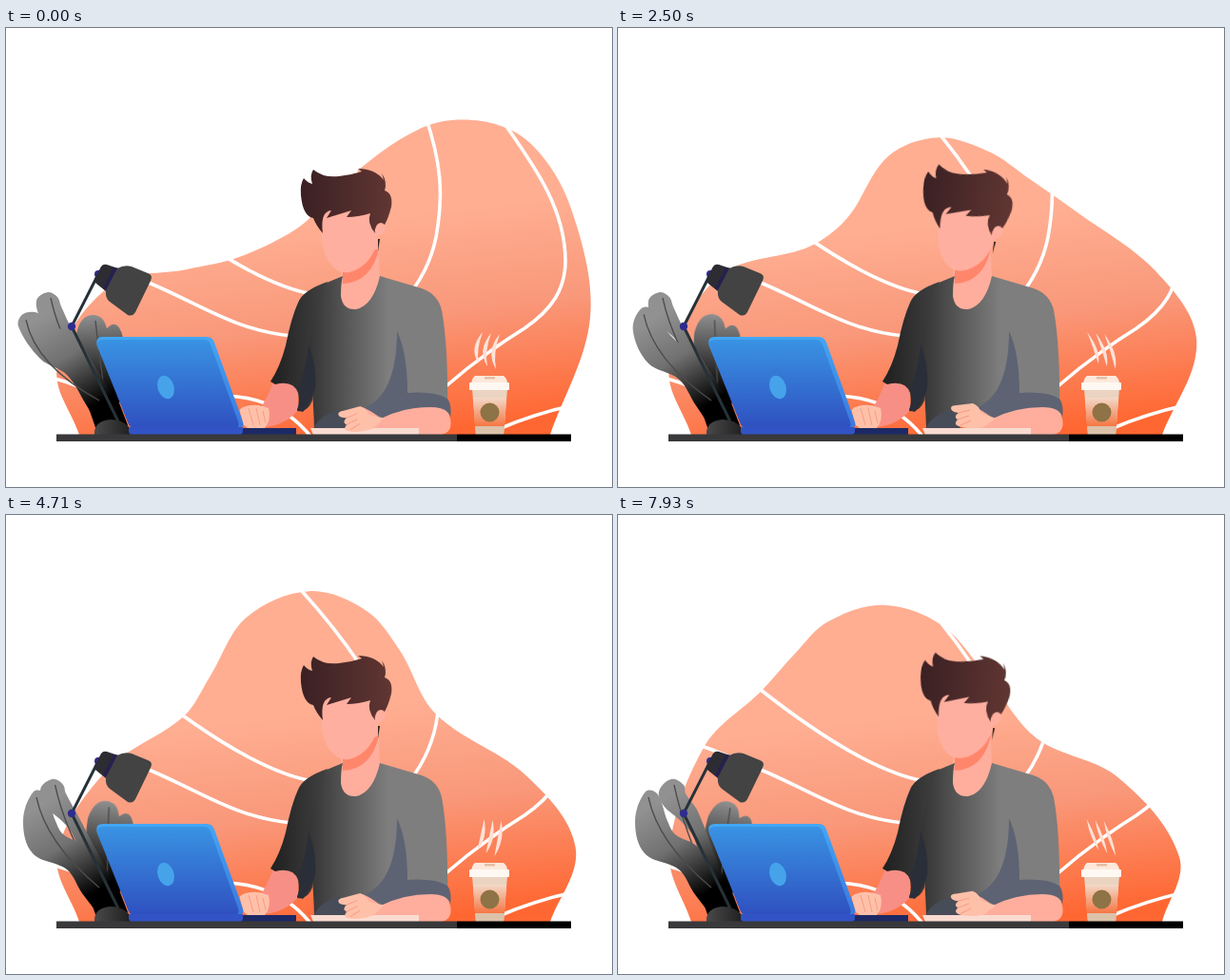
Animation of 637 by 483 pixels, one loop 8 s. Source, as an HTML page:

```html
<!DOCTYPE html>
<html lang="en">
<head>
<meta charset="utf-8">
<title>Working at a desk</title>
<style>
  html, body { margin: 0; width: 100%; height: 100%; overflow: hidden; background: #fff; }
  svg { display: block; width: 100%; height: 100%; }
  .lines { fill: none; stroke: #fff; stroke-width: 3.6; }
  .vein { fill: none; stroke: #4b4b4b; stroke-width: 1.3; }
  .arm { fill: none; stroke: #263238; stroke-width: 3; }
  .crease { fill: none; stroke: #f79c86; stroke-width: 1; }
  .skin { fill: #ffae9d; }
  .hand { fill: #ffc0a9; }
  .sway { transform-origin: 105px 400px; animation: sway 8s linear infinite; }
  @keyframes sway { to { transform: rotate(15deg); } }
</style>
</head>
<body>
<svg viewBox="0 0 637 483">
  <defs>
    <linearGradient id="coral" gradientUnits="userSpaceOnUse" x1="320" y1="208" x2="347" y2="436">
      <stop stop-color="#ffae92"/><stop offset=".46" stop-color="#f9987a"/><stop offset="1" stop-color="#ff6732"/>
    </linearGradient>
    <linearGradient id="leafFill" gradientUnits="userSpaceOnUse" x1="38" y1="305" x2="92" y2="398">
      <stop stop-color="#919191"/><stop offset=".45" stop-color="#717171"/><stop offset="1" stop-color="#000"/>
    </linearGradient>
    <linearGradient id="backFill" gradientUnits="userSpaceOnUse" x1="98" y1="300" x2="102" y2="385">
      <stop stop-color="#929292"/><stop offset="1" stop-color="#000"/>
    </linearGradient>
    <linearGradient id="potFill"><stop stop-color="#4a4a4a"/><stop offset="1" stop-color="#1c1c1c"/></linearGradient>
    <linearGradient id="lidFill" x2="0" y2="1"><stop stop-color="#3993e3"/><stop offset="1" stop-color="#2f50c0"/></linearGradient>
    <linearGradient id="edgeFill" x2="0" y2="1"><stop stop-color="#43a7f4"/><stop offset="1" stop-color="#3a78e0"/></linearGradient>
    <linearGradient id="shirt" gradientUnits="userSpaceOnUse" x1="310" y1="0" x2="402" y2="0">
      <stop stop-color="#2c2c2c"/><stop offset="1" stop-color="#7e7e7e"/>
    </linearGradient>
    <linearGradient id="sleeve" gradientUnits="userSpaceOnUse" x1="285" y1="0" x2="352" y2="0">
      <stop stop-color="#232323"/><stop offset="1" stop-color="#4a4a4a"/>
    </linearGradient>
    <linearGradient id="hairFill"><stop stop-color="#3a2023"/><stop offset="1" stop-color="#613632"/></linearGradient>
    <linearGradient id="cupSleeve" x2="0" y2="1"><stop stop-color="#f3d9c8"/><stop offset="1" stop-color="#f67643"/></linearGradient>
  </defs>

  <path id="blob" fill="url(#coral)"/>
  <g class="lines">
    <path d="M296 64Q340 110 371 156"/>
    <path d="M440 90C458 142 460 176 452 220Q446 250 428 275"/>
    <path d="M525 102C555 145 588 190 588 245C588 275 574 296 545 316Q500 344 460 379"/>
    <path d="M130 168C190 217 265 270 322 280"/>
    <path d="M70 237Q110 250 150 268C205 291 240 318 300 324"/>
    <path d="M48 368Q75 375 105 390M230 387C270 388 300 403 322 432"/>
    <path d="M518 422Q555 406 596 397"/>
  </g>

  <path d="M80 380L100 345L128 418L96 426Z"/>
  <g class="sway">
    <path fill="url(#backFill)" d="M94 402Q72 350 74 322Q78 301 93 302Q103 303 106 316Q118 304 123 326L124 392Z"/>
    <path class="vein" d="M94 308Q98 345 104 385"/>
  </g>
  <path id="middle" fill="url(#leafFill)"/><path id="middleVein" class="vein"/>
  <path id="left" fill="url(#leafFill)"/><path id="leftVein" class="vein"/>

  <path class="arm" d="M97 259L69 314L118 414"/>
  <g fill="#2f2c8f"><circle cx="97" cy="259" r="4"/><circle cx="69" cy="314" r="4.2"/></g>
  <path fill="#2c2c32" d="M100 251Q102 248 106 249L118 253L105 277L95 269Q92 266 94 262Z"/>
  <path fill="#25214f" d="M113 252L119 253L107 278L102 274Z"/>
  <path fill="#434343" d="M117 253Q124 249 132 251L149 258Q155 260 152 266L136 299Q133 304 128 302L109 288Q104 284 105 276Z"/>
  <path fill="url(#potFill)" d="M93 428Q92 414 109 412Q128 412 134 428Z"/>

  <path class="skin" d="M391 218L393 262L398 285L372 301L349 293L353 250Z"/>
  <path fill="#ff866b" d="M392 232Q384 268 354 269V248Z"/>

  <path fill="#f78f86" d="M281 373Q299 370 307 381V402Q296 416 274 420L266 403Q274 390 281 373Z"/>
  <path fill="url(#shirt)" d="M354 261Q352 268 352 282Q354 297 368 296Q386 292 393 261L437 274Q454 280 458 297Q465 335 464 402L395 411L350 421H324Q322 360 315 330Q306 288 330 271Z"/>
  <path fill="url(#sleeve)" d="M338 267Q312 276 307 289Q300 304 294 334Q288 357 278 372L283 375Q302 370 307 384Q309 394 306 403Q317 405 322 392Q328 365 318 333Q324 290 338 267Z"/>
  <path fill="#2a2e38" d="M318 333Q327 355 325 379Q319 397 312 404L306 402Q311 391 307 378Q315 362 318 333Z"/>
  <path fill="#5d6373" d="M411 319Q422 342 422 384Q450 382 464 390Q469 397 467 410L400 412L376 400Q411 386 411 319Z"/>
  <path fill="#474c59" d="M323 422Q330 406 352 402L360 421Z"/>
  <path class="skin" d="M372 398Q382 401 394 411Q418 399 446 399Q466 399 467 411Q470 425 458 428H434V421H370Z"/>
  <path fill="#f9dbd1" d="M320 421H434V428H323Z"/>
  <g id="hand">
    <path class="hand" d="M350 400Q350 397 356 397L373 395Q379 397 382 405L397 411L384 420Q370 423 358 419Q352 417 357 412Q352 409 358 405Q350 404 350 400Z"/>
    <path class="crease" d="M358 405L370 402M357 412L369 408M360 418L371 413"/>
  </g>

  <g id="head">
    <path fill="#ffaf9f" d="M332 190C330 212 330 233 341 248Q349 259 361 257C378 253 390 236 391 219Q400 216 399 207Q394 201 389 208L384 185L340 184Z"/>
    <path fill="#35201f" d="M391 222H393L391 235Z"/>
    <path fill="url(#hairFill)" d="M323 149Q334 158 350 156Q362 155 374 151L370 148Q388 148 397 160L395 153Q401 162 398 171Q407 174 405 188Q402 200 398 207Q394 203 390 207Q387 212 388 216Q379 205 383 195Q370 199 358 199L363 192Q350 196 337 200L342 192Q330 193 333 216Q326 208 323 200Q312 198 310 176Q309 164 313 158Q317 163 322 164Q319 155 323 149Z"/>
  </g>

  <rect x="240" y="421" width="65" height="7" fill="#1d2964"/>
  <path fill="url(#edgeFill)" d="M102 325H211Q217 325 219 331L249 414Q251 421 244 421H134L96 335Q93 325 102 325Z"/>
  <path fill="url(#lidFill)" d="M103 328H208Q213 328 215 333L244 414Q246 420 241 421H135Q130 421 128 415L96 335Q94 328 103 328Z"/>
  <path fill="#3153c6" d="M129 420H249V424Q249 428 245 428H133Q129 428 129 424Z"/>
  <ellipse cx="168" cy="378" rx="8.5" ry="12.5" fill="#46a3ea" transform="rotate(-18 168 378)"/>
  <path class="hand" d="M276 400Q266 396 257 397Q244 399 246 404L250 418L254 421H272Q279 413 276 400Z"/>
  <path class="crease" d="M255 400L260 418M263 400L267 418M270 403L273 416"/>

  <path fill="#fde9dc" d="M493 366H523Q527 369 527 374H489Q490 368 493 366Z"/>
  <rect x="503" y="367" width="11" height="2.5" fill="#e5bfa6"/>
  <path fill="#ead4c1" d="M490 380H527L523 428H494Z"/>
  <path fill="url(#cupSleeve)" d="M491 389H526L524 419H493Z"/>
  <path fill="#ddc2aa" d="M493 419H524L523 428H494Z"/>
  <rect x="487" y="373" width="42" height="8" rx="1" fill="#fff8f2"/>
  <circle cx="508.500" cy="404.500" r="10" fill="#8d7345"/>
  <path id="steam" fill="#ffe1d7"/>

  <rect x="53" y="427.500" width="421" height="7.500" fill="#39393b"/>
  <rect x="474" y="427.500" width="120" height="7.500"/>
</svg>
<script>
const LOOP = 8000, FPS = 14;
const $ = id => document.getElementById(id);
const parse = text => text.split(/[ ,]+/).map(Number);
const mix = (a, b, u) => a.map((v, i) => v + (b[i] - v) * u);
const progress = (t, start, end) => Math.min(1, Math.max(0, (t - start) / (end - start)));

// The backdrop's moving outline, one pose at each quarter of the loop.
const hills = [
  '110,271 190,254 245,241 310,208 350,166 437,105 500,98 552,122 594,190 614,305',
  '105,261 205,235 247,208 291,142 342,123 395,137 438,162 489,187 572,252 610,325',
  '112,261 190,215 222,177 262,115 321,92 378,111 410,145 453,207 550,273 603,345',
  '100,277 180,207 202,155 236,95 314,59 380,82 421,138 450,214 545,280 591,360',
  '90,243 150,184 185,146 220,113 278,96 340,118 390,176 440,236 525,276 590,360'
].map(parse);

// Each leaf unfolds from its first pose to its second.
const leaves = {
  left: {
    poses: ['84,396 64,365 36,348 13,314 18,301 34,300 48,312 62,320 84,348',
            '80,398 64,373 28,356 18,322 29,291 41,293 52,322 60,336 84,350'].map(parse),
    base: [100, 424, 116, 414], span: [0, 4500], tip: 4
  },
  middle: {
    poses: ['62,330 50,318 38,308 32,287 44,278 54,283 58,293 70,318',
            '80,340 66,322 48,306 43,291 56,278 69,284 71,293 84,312'].map(parse),
    base: [92, 390, 112, 385], span: [3000, 7500], tip: 4
  }
};

// Smooth curve through flat coordinates, closed by a straight line.
function smooth(c) {
  const p = [];
  for (let i = 0; i < c.length; i += 2) p.push([c[i], c[i + 1]]);
  const heading = p.map((_, i) => {
    const a = p[i - 1] || p[i], b = p[i + 1] || p[i];
    const dx = b[0] - a[0], dy = b[1] - a[1], length = Math.hypot(dx, dy);
    return [dx / length, dy / length];
  });
  let d = 'M' + p[0];
  for (let i = 1; i < p.length; i++) {
    const a = p[i - 1], b = p[i], reach = Math.hypot(b[0] - a[0], b[1] - a[1]) / 3;
    const c1 = a.map((v, k) => v + heading[i - 1][k] * reach);
    const c2 = b.map((v, k) => v - heading[i][k] * reach);
    d += `C${c1} ${c2} ${b}`;
  }
  return d + 'Z';
}

function drawBlob(t) {
  const step = t / LOOP * (hills.length - 1), i = Math.floor(step);
  $('blob').setAttribute('d', smooth([77, 428, 54, 356, ...mix(hills[i], hills[i + 1], step - i), 572, 428]));
}

function drawLeaf(id, t) {
  const { poses, base, span, tip } = leaves[id];
  const c = mix(...poses, progress(t, ...span));
  $(id).setAttribute('d', smooth([...base.slice(0, 2), ...c, ...base.slice(2)]));
  const x = c[tip * 2] + 3, y = c[tip * 2 + 1] + 6;
  $(id + 'Vein').setAttribute('d', `M${x} ${y}Q${x + 10} ${y + 48} 98 392`);
}

function drawSteam(t) {
  const phase = 2 * Math.PI * t / 5800 + 0.87;
  const lean = 10 * Math.cos(phase) - 2.5, bulge = -12 * Math.sin(phase);
  const wisp = i => {
    const x = 499 + 9 * i, y = 320 + i;
    const top = `${x + lean / 2} ${y}`, bottom = `${x - lean / 2} ${y + 33 + 2 * i}`;
    return `M${top}Q${x + bulge - 4} ${y + 18} ${bottom}Q${x + bulge + 4} ${y + 20} ${top}Z`;
  };
  $('steam').setAttribute('d', [0, 1, 2].map(wisp).join(''));
}

function draw() {
  const t = Math.floor((performance.now() % LOOP) * FPS / 1000 + 0.1) * 1000 / FPS % LOOP;
  drawBlob(t);
  drawLeaf('middle', t);
  drawLeaf('left', t);
  const tilt = 3.8 * (1 - Math.cos(2 * Math.PI * t / 4750));
  $('head').setAttribute('transform', `rotate(${tilt} 372 255)`);
  $('hand').setAttribute('transform', `rotate(${(tilt - 7.5) * 1.1} 395 408)`);
  drawSteam(t);
  requestAnimationFrame(draw);
}
draw();
</script>
</body>
</html>
```
